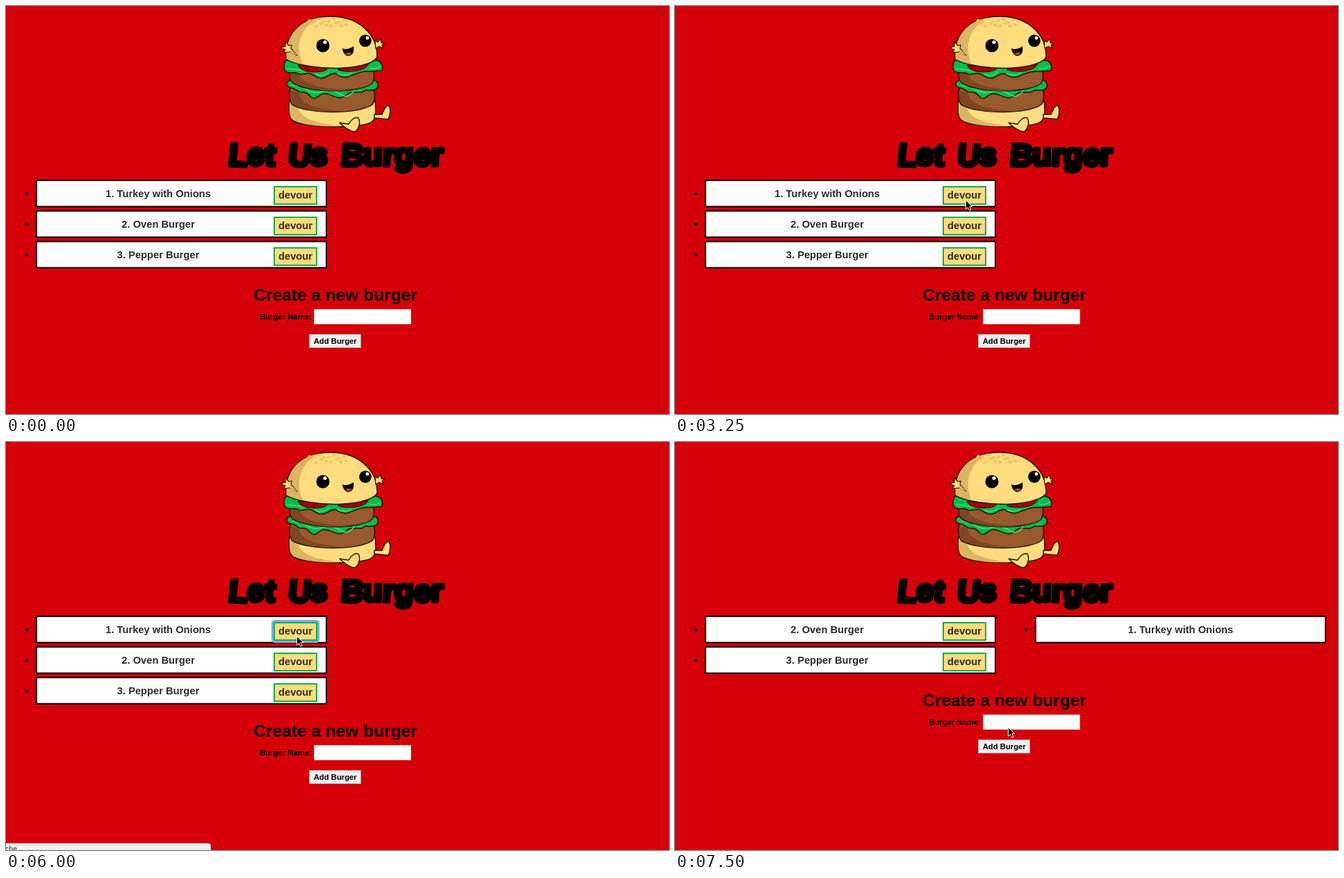
These frames come from a looping animation (954x587 px, 8000 ms). An HTML page:

```html
<!DOCTYPE html>
<html lang="en">
<head>
<meta charset="utf-8">
<title>Burger list</title>
<style>
  html, body { margin: 0; width: 100%; height: 100%; overflow: hidden; background: #d60008; }
  svg { display: block; width: 100vw; height: 100vh; }
  text { font-family: "Liberation Sans", Arial, sans-serif; font-weight: bold; text-anchor: middle; }
  .title text { font-size: 45px; text-anchor: start; stroke: #000; stroke-width: 5.5; stroke-linejoin: round; }
  .row { font-size: 14.7px; fill: #2b2b2b; }
  .row .card { fill: #fff; stroke: #000; stroke-width: 2; }
  .row .devour { fill: #fddc7c; stroke: #14ad4c; stroke-width: 2; }
  .form { font-size: 11.3px; }
  .form .heading { font-size: 24.5px; }
  .status text { font-size: 10.5px; font-weight: normal; text-anchor: start; fill: #333; }
  .burger { stroke: #211407; stroke-width: 1.5; stroke-linejoin: round; }
  .plain { stroke: none; }
</style>
</head>
<body>
<svg viewBox="0 0 954 587" preserveAspectRatio="none">
  <rect width="954" height="587" fill="#d60008"/>

  <g class="burger">
    <!-- bottom bun -->
    <path fill="#ffdd7f" d="M408 136C406 150 407 160 413 165C430 176 515 177 527 166C534 160 532 148 531 136Z"/>
    <path class="plain" fill="#dcb562" d="M409 140C407 155 409 162 414 164C430 173 460 174 482 173C450 169 425 164 420 146Z"/>
    <!-- lower patty and lettuce -->
    <path fill="#98592c" d="M409 118C407 128 408 138 412 142C435 156 508 156 527 142C532 136 531 126 529 116Z"/>
    <path class="plain" fill="#7d4721" d="M410 122C408 134 410 139 414 142C435 153 470 153 490 151C450 149 424 143 421 124Z"/>
    <path fill="#06bb4c" d="M408 107C401 111 404 117 411 118C417 118 418 124 425 124C433 123 435 128 440 132C446 136 450 127 457 126C467 126 474 133 482 132C490 131 490 124 498 124C506 124 512 126 517 121C524 122 537 122 535 113C535 108 530 106 526 107Z"/>
    <path fill="none" stroke="#4fd67c" stroke-width="1.6" d="M411 114Q425 115 434 121T456 123T481 127T502 120"/>
    <!-- upper patty, tomatoes and lettuce -->
    <path fill="#98592c" d="M410 90C407 101 408 107 413 111C437 126 508 125 526 112C531 106 530 98 528 88Z"/>
    <path class="plain" fill="#7d4721" d="M411 94C409 104 411 109 415 111C437 122 468 123 490 121C450 118 425 113 421 96Z"/>
    <path fill="#06bb4c" d="M405 77C398 82 399 93 404 95C411 98 415 94 420 97C424 101 430 96 437 97C445 99 447 104 454 104C463 104 464 97 474 97C480 102 490 105 497 100C504 97 510 95 518 94C526 95 531 93 540 93C544 89 541 79 532 78Z"/>
    <path fill="none" stroke="#4fd67c" stroke-width="1.6" d="M404 90Q418 91 431 94M445 98Q457 103 465 94M477 97Q490 103 498 95M523 89Q533 92 539 86"/>
    <path fill="#a50008" stroke-width="1" d="M420 85Q424 95 443 95Q460 95 464 89ZM477 91Q483 95 500 94Q518 92 522 83Z"/>
    <!-- top bun -->
    <path fill="#ffdd7f" d="M403 77C400 40 425 15 467 15C508 15 535 41 534 74C521 93 441 95 403 77Z"/>
    <path class="plain" fill="#dcb562" d="M404 76C401 43 421 22 449 17C420 35 417 60 427 84Q414 82 404 76Z"/>
    <g id="seeds" fill="#f7cf72" stroke="#dfb055" stroke-width=".7"></g>
    <!-- arms -->
    <path fill="#ffdd7f" stroke-width="1.2" d="M419 71L409 66 399 67 402 63 395 60 402 58 402 51 407 57 411 56 410 61Z"/>
    <path class="plain" fill="#dcb562" d="M409 61L420 71 409 67Z"/>
    <path fill="#ffdd7f" stroke-width="1.2" d="M532 61L537 58 543 61 541 56 545 54 540 53 539 47 535 52 531 50Z"/>
    <!-- legs -->
    <path fill="#ffdd7f" d="M530 156L541 156C544 149 546 143 551 143C554 148 553 158 550 163L530 161Z"/>
    <path fill="#ffdd7f" d="M480 168L493 170C496 164 502 159 507 161C511 168 507 179 501 181C493 179 486 174 480 168Z"/>
    <!-- face -->
    <g class="plain">
      <circle cx="456" cy="57" r="9.5"/><circle cx="459" cy="52" r="2.6" fill="#fff"/>
      <circle cx="517" cy="50" r="8.8"/><circle cx="520" cy="46" r="2.4" fill="#fff"/>
      <path d="M484 61Q491 64 500 58Q502 71 492 72Q485 70 484 61Z"/>
      <path fill="#a54b2a" d="M488 69Q492 65 498 68Q494 73 488 69Z"/>
    </g>
  </g>

  <g class="title" transform="translate(0 229.5) skewX(-3)">
    <text x="319" rotate="3 -2 2">Let</text>
    <text x="405" rotate="3 -2">Us</text>
    <text x="481" rotate="2 -1 1 -1 1 -1">Burger</text>
  </g>

  <g id="before"></g>
  <g id="after"></g>

  <g class="form" id="form">
    <text class="heading" x="474" y="423.5">Create a new burger</text>
    <text x="402.5" y="451">Burger Name:</text>
    <rect x="443.5" y="436.5" width="139" height="21" fill="#fff" stroke="#e6b9bb"/>
    <rect x="436.5" y="472.5" width="74" height="19" fill="#efefef" stroke="#b9a9a9"/>
    <text x="473.7" y="485.5">Add Burger</text>
  </g>

  <rect id="ring" x="383.5" y="257.5" width="66" height="30" rx="3" fill="none" stroke="#78aeee" stroke-width="3"/>

  <g class="status" id="status">
    <path d="M-2 590V577.5H291Q294.5 577.5 294.5 581V590Z" fill="#f1f1f1" stroke="#b5a5a5"/>
    <text id="statusText" x="-1" y="588.5"></text>
  </g>

  <path id="cursor" d="M0 0V12.6L3 10 5.3 14.8 7.5 13.8 5.3 9.2H9.2Z" stroke="#fff" stroke-width=".9"/>
</svg>
<script>
const LOOP = 8000;
const $ = id => document.getElementById(id);

const row = (x, index, label, eaten) => {
  const y = 250 + index * 44;
  const button = eaten ? '' : `
    <rect class="devour" x="386" y="${y + 10}" width="61" height="25"/>
    <text x="416.5" y="${y + 27}">devour</text>`;
  return `<g class="row">
    <circle cx="${x - 13}" cy="${y + 20}" r="2.6"/>
    <rect class="card" x="${x + .8}" y="${y + .8}" width="417.2" height="37.8"/>
    <text x="${x + (eaten ? 209.5 : 176)}" y="${y + 25}">${label}</text>${button}</g>`;
};

const names = ['1. Turkey with Onions', '2. Oven Burger', '3. Pepper Burger'];
$('before').innerHTML = names.map((name, i) => row(43, i, name)).join('');
$('after').innerHTML = names.slice(1).map((name, i) => row(43, i, name)).join('') + row(518, 0, names[0], true);

$('seeds').innerHTML = Array.from({ length: 16 }, (_, i) => {
  const x = 436 + (i % 8) * 7.2 + (i > 7 ? 3 : 0);
  const y = (i > 7 ? 27 : 21) + 2.5 * Math.sin(i * 2.3);
  return `<ellipse cx="${x}" cy="${y}" rx="2.5" ry="1.5" transform="rotate(${i * 47 % 60 - 30} ${x} ${y})"/>`;
}).join('');

// [start, value...]; each value holds until the next start
const cursorSteps = [
  [0, -50, -50], [750, 500, 285], [1000, 462, 351], [1250, 466, 411], [1500, 473.5, 432],
  [1750, 474, 456], [2000, 418, 377], [2250, 416, 291], [2500, 418, 281], [3000, 418.5, 279.5],
  [7000, 443, 290], [7250, 472, 366], [7500, 479.5, 410.5]
];
const statusSteps = [
  [0, 0, ''], [5500, .5, 'erver...'], [5750, 1, 'erver...'], [6000, 1, 'che...'], [6500, 0, '']
];
const stepAt = (steps, t) => steps.filter(step => step[0] <= t).pop();
const show = (id, on) => $(id).style.display = on ? '' : 'none';

function draw(t) {
  const [, x, y] = stepAt(cursorSteps, t);
  const [, opacity, label] = stepAt(statusSteps, t);
  const devoured = t >= 6250;
  show('before', !devoured);
  show('after', devoured);
  show('ring', t >= 5250 && !devoured);
  $('form').setAttribute('transform', `translate(0 ${devoured ? -44 : 0})`);
  $('cursor').setAttribute('transform', `translate(${x} ${y})`);
  $('status').setAttribute('opacity', opacity);
  $('statusText').textContent = label;
}

const start = performance.now();
function frame() {
  draw((performance.now() - start) % LOOP);
  requestAnimationFrame(frame);
}
frame();
</script>
</body>
</html>
```
